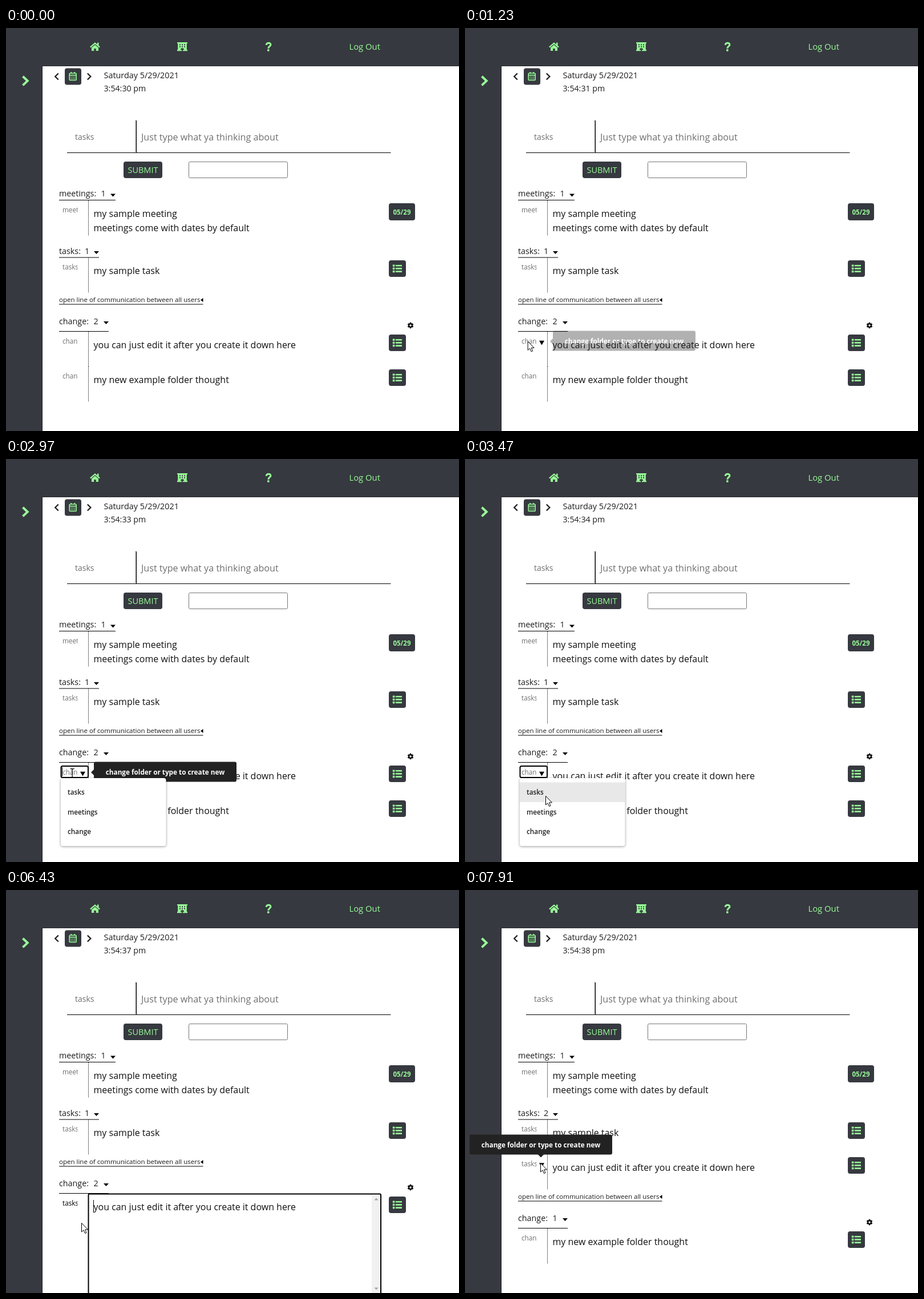
An HTML page for the animation above (8 s loop, 794 px wide and 706 px high).

```html
<!DOCTYPE html>
<html lang="en">
<head>
<meta charset="utf-8">
<title>Task notes</title>
<style>
  html, body { margin: 0; width: 100%; height: 100%; overflow: hidden; background: #fff; }
  svg { display: block; font-family: "Open Sans", "Noto Sans", sans-serif; }
  #menu { filter: drop-shadow(0 1px 2px #0006); }
</style>
</head>
<body>
<svg id="stage" width="794" height="706" viewBox="0 0 794 706"></svg>
<script>
const DARK = '#36393f', GREEN = '#98fb98', GRAY = '#6f6f6f', INK = '#1c1c1c';
const LOOP = 8000;

const text = (x, y, str, size, fill = INK, attrs = '') =>
  `<text x="${x}" y="${y}" font-size="${size}" fill="${fill}" ${attrs}>${str}</text>`;
const rect = (x, y, w, h, fill, attrs = '') =>
  `<rect x="${x}" y="${y}" width="${w}" height="${h}" fill="${fill}" ${attrs}/>`;
const path = (d, fill = INK, attrs = '') => `<path d="${d}" fill="${fill}" ${attrs}/>`;
const stroke = (d, color, width, attrs = '') =>
  path(d, 'none', `stroke="${color}" stroke-width="${width}" ${attrs}`);
const group = (id, ...parts) => `<g id="${id}">${parts.join('')}</g>`;
const shift = (y, body) => `<g transform="translate(0 ${y})">${body}</g>`;
const button = (x, y, w, h) => rect(x, y, w, h, DARK, 'rx="4"');

const label = (y, str, fill = GRAY) => text(99, y, str, 11.7, fill, 'clip-path="url(#field)"');

const listButton = y => button(671, y, 30, 29) + [9.2, 14.4, 19.6].map(dy =>
  rect(677.8, y + dy - 1.8, 3.6, 3.6, GREEN, 'rx=".8"') +
  rect(682.8, y + dy - 1.3, 11.2, 2.6, GREEN, 'rx=".6"')).join('');

const dateButton = y => button(671, y, 46, 30) +
  text(694, y + 19.5, '05/29', 11.5, GREEN, 'font-weight="700" text-anchor="middle"');

function heading(y, name, count, countX, end, lineY) {
  return text(93, y, name, 14.3) + text(countX, y, count, 14.3) +
    path(`M${end - 9} ${y - 4.5}h9l-4.5 5z`, '#000') +
    rect(93, lineY, end - 93, 1, '#000');
}

function row(y, folder, lines, action = listButton) {
  return stroke(`M144.5 ${y}v61`, '#000', 1, 'stroke-dasharray="1 1"') +
    label(y + 21, folder) +
    lines.map((line, i) => text(153.5, y + 28.5 + i * 25, line, 15.97, '#111')).join('') +
    action(y + 5);
}

const gear = (x, y) => `<g transform="translate(${x} ${y})">` +
  stroke([30, 90, 150].map(a => {
    const c = 5.3 * Math.cos(a * Math.PI / 180), s = 5.3 * Math.sin(a * Math.PI / 180);
    return `M${c} ${s}L${-c} ${-s}`;
  }).join(''), '#000', 2.6) +
  '<circle r="2.9" fill="#fff" stroke="#000" stroke-width="2.2"/></g>';

const changeList = count =>
  text(93, 480, 'open line of communication between all users', 11.52) +
  rect(93, 483.5, 252.5, 1, '#000') + path('M341 476.5l4.5-3.5v7z', '#000') +
  heading(518.5, 'change:', count, 153.5, 180, 531) + gear(709, 521);

const tooltip = (id, x, y, arrow) => group(id,
  rect(x, y, 250, 35, '#222', 'rx="3"'), path(arrow, '#222'),
  text(x + 125, y + 22.5, 'change folder or type to create new', 11.75, '#fff',
    'font-weight="700" text-anchor="middle"'));

const frame =
  rect(0, 0, 794, 67, DARK) + rect(64, 66, 730, 1, '#25272b') + rect(0, 67, 64, 639, DARK) +
  stroke('M63.5 67V706', '#000', 1, 'stroke-dasharray="1 1"') +
  // home
  stroke('M147.8 33.6L156 26.6l8.2 7', GREEN, 2.1) + rect(160, 25.6, 2.5, 5, GREEN) +
  path('M150 34.6l6-5 6 5V40h-4.2v-4h-3.6v4h-4.2z', GREEN) +
  // building
  path('M300 25h18v2h-1.2v11h1.2v2.3h-18V38h1.2V27H300z', GREEN) +
  [304, 308, 312].map(x => rect(x, 28.3, 2, 2, DARK) + rect(x, 31.8, 2, 2, DARK)).join('') +
  path('M305.8 38.2a3.2 3 0 0 1 6.4 0z', DARK) + rect(307.9, 38.2, 2.2, 2.2, DARK) +
  // help
  stroke('M456 29.8C457 25 464.3 25.3 463.9 29.5 463.6 32 460 32 459.8 35.8', GREEN, 3) +
  '<circle cx="459.8" cy="39" r="2" fill="' + GREEN + '"/>' +
  text(601.5, 38, 'Log Out', 14.8, GREEN) +
  stroke('M29.5 84.8l8.2 7.8-8.2 7.8', GREEN, 4) +
  // date bar
  stroke('M91.8 79.5L86.2 85l5.6 5.5M142.8 79.5l5.6 5.5-5.6 5.5', INK, 2.2) +
  button(103, 70.5, 29, 29) +
  rect(111.2, 79.3, 12, 12.2, 'none', `rx="1.2" stroke="${GREEN}" stroke-width="1.6"`) +
  stroke('M114.3 77v3M120.2 77v3M111 82.6h12.5', GREEN, 1.8) +
  stroke('M113.3 86h8M113.3 89h8', GREEN, 1.6, 'stroke-dasharray="1.8 1.3"') +
  text(171.5, 88, 'Saturday 5/29/2021', 14.4) +
  text(171.5, 110.5, '', 14.2, INK, 'id="clock"') +
  // entry form
  text(121, 196, 'tasks', 14, GRAY) +
  text(237, 196.5, 'Just type what ya thinking about', 16.15, GRAY) +
  rect(228, 162, 1, 56, '#000') +
  stroke('M227.5 162v56', '#000', 1, 'stroke-dasharray="1 1"') +
  rect(107, 218, 567.5, 1, '#000') +
  button(206, 234, 68, 29) + text(240, 254, 'SUBMIT', 14.5, GREEN, 'text-anchor="middle"') +
  rect(320.5, 234.5, 173, 28, '#fff', 'rx="2" stroke="#767676"') +
  heading(295, 'meetings:', 1, 166.5, 192, 301) +
  row(302, 'meet', ['my sample meeting', 'meetings come with dates by default'], dateButton) +
  row(402, 'tasks', ['my sample task']);

const editText = 'you can just edit it after you create it down here';

document.getElementById('stage').innerHTML =
  '<clipPath id="field"><rect x="97" width="28.5" height="706"/></clipPath>' + frame +
  group('before',
    heading(395.5, 'tasks:', 1, 138, 163, 401.5), changeList(2), row(532, '', [editText])) +
  group('after',
    heading(395.5, 'tasks:', 2, 138, 163, 401.5), shift(61, changeList(1)),
    row(463, 'tasks', [editText])) +
  group('second', row(593, 'change', ['my new example folder thought'])) +
  group('ring', rect(96.5, 538, 47.5, 20, '#fff', 'rx="2.5" stroke="#000" stroke-width="2"')) +
  group('oldFolder', label(553, 'change')) +
  group('newFolder', label(553, 'tasks', '#000')) +
  group('caretStart', rect(98, 540, 1, 16, '#000')) +
  group('caretEnd', rect(125, 540, 1, 16, '#000')) +
  group('arrow', path('M130 547.8h9l-4.5 7.7z', '#000')) +
  group('arrowAfter', path('M130 478.3h9l-4.5 7.7z', '#000')) +
  group('editor',
    rect(144.5, 532.5, 512.5, 178, '#fff', 'rx="2" stroke="#000" stroke-width="2"'),
    rect(641, 534, 15, 172, '#f1f1f1'),
    path('M645.5 543.5h7l-3.5-4zM645.5 696.5h7l-3.5 4z', '#a3a3a3'),
    text(153.5, 560.5, editText, 15.97, '#111'), rect(153, 543, 1, 22, '#000')) +
  tooltip('sideTip', 154, 530.5, 'M149 549l5.5-5.5v11z') +
  tooltip('topTip', 8, 428.5, 'M127.5 463h11l-5.5 5.5z') +
  group('menu',
    rect(96, 559, 184.5, 119, '#fff', 'rx="4"'),
    group('hover', rect(96, 566.5, 184.5, 34.5, '#e8e8e8')),
    ['tasks', 'meetings', 'change'].map((name, i) =>
      text(108, 588.3 + i * 34.5, name, 11.8, '#222', 'font-weight="600"')).join('')) +
  group('pointer',
    group('hand', path('M.5 .5V16l3.5-3.2 2.5 5.7 2.5-1.1-2.4-5.5h4.9z', '#fff', 'stroke="#000"')),
    group('beam', stroke('M-3.5-7.5H-1L0-6.5 1-7.5H3.5M0-6.5V6.5M-3.5 7.5H-1L0 6.5 1 7.5H3.5', '#000', 1.2)));

const ids = Object.fromEntries(
  [...document.querySelectorAll('[id]')].map(el => [el.id, el]));

// time, x, y
const pointerPath = [
  [300, 600, 750], [1020, 125, 558], [1260, 109, 548], [1370, 116, 550], [2950, 116, 550],
  [3440, 141, 590], [4400, 141, 590], [4560, 138, 588], [5000, 138, 588], [5160, 132, 583],
  [7000, 132, 583], [7700, 132, 478]
];
const ticks = [330, 1370, 2370, 3400, 4420, 5430, 6400, 7380];

const clamp = v => Math.min(1, Math.max(0, v));
const ramp = (t, from, to) => clamp((t - from) / (to - from));
const smooth = p => p * p * (3 - 2 * p);
const within = (t, ...spans) => spans.some(([from, to]) => t >= from && t < to);

function pointerAt(t) {
  if (t >= pointerPath.at(-1)[0]) return pointerPath.at(-1).slice(1);
  const i = Math.max(1, pointerPath.findIndex(key => t < key[0]));
  const [t0, x0, y0] = pointerPath[i - 1], [t1, x1, y1] = pointerPath[i];
  const p = smooth(ramp(t, t0, t1));
  return [x0 + (x1 - x0) * p, y0 + (y1 - y0) * p];
}

function render(t) {
  const show = (id, amount) => { ids[id].style.opacity = +amount; };
  const moved = t >= 6690, editing = within(t, [6380, 6690]);
  const [x, y] = pointerAt(t);

  ids.clock.textContent = `3:54:${30 + ticks.filter(tick => t >= tick).length} pm`;
  show('before', !moved);
  show('after', moved);
  show('second', !editing);
  show('editor', editing);
  show('ring', within(t, [1570, 6380]));
  show('oldFolder', t < 3780);
  show('newFolder', within(t, [3780, 6690]));
  show('arrow', within(t, [1150, 6380]));
  show('arrowAfter', t >= 7560);
  show('caretStart', within(t, [1600, 2170], [2640, 3140]));
  show('caretEnd', within(t, [3960, 4490], [5020, 5550], [6080, 6380]));
  show('sideTip', ramp(t, 1150, 1380) * (1 - ramp(t, 3080, 3330)));
  show('topTip', ramp(t, 7600, 7900));
  show('menu', ramp(t, 1560, 1700) * (1 - ramp(t, 3760, 4060)));
  show('hover', t > 3000 && y >= 567);
  show('pointer', t >= 520);
  const beam = within(t, [1370, 3080]);
  show('beam', beam);
  show('hand', !beam);
  ids.pointer.setAttribute('transform', `translate(${x} ${y})`);
}

const start = performance.now();
(function tick() {
  render((performance.now() - start) % LOOP);
  requestAnimationFrame(tick);
})();
</script>
</body>
</html>
```
